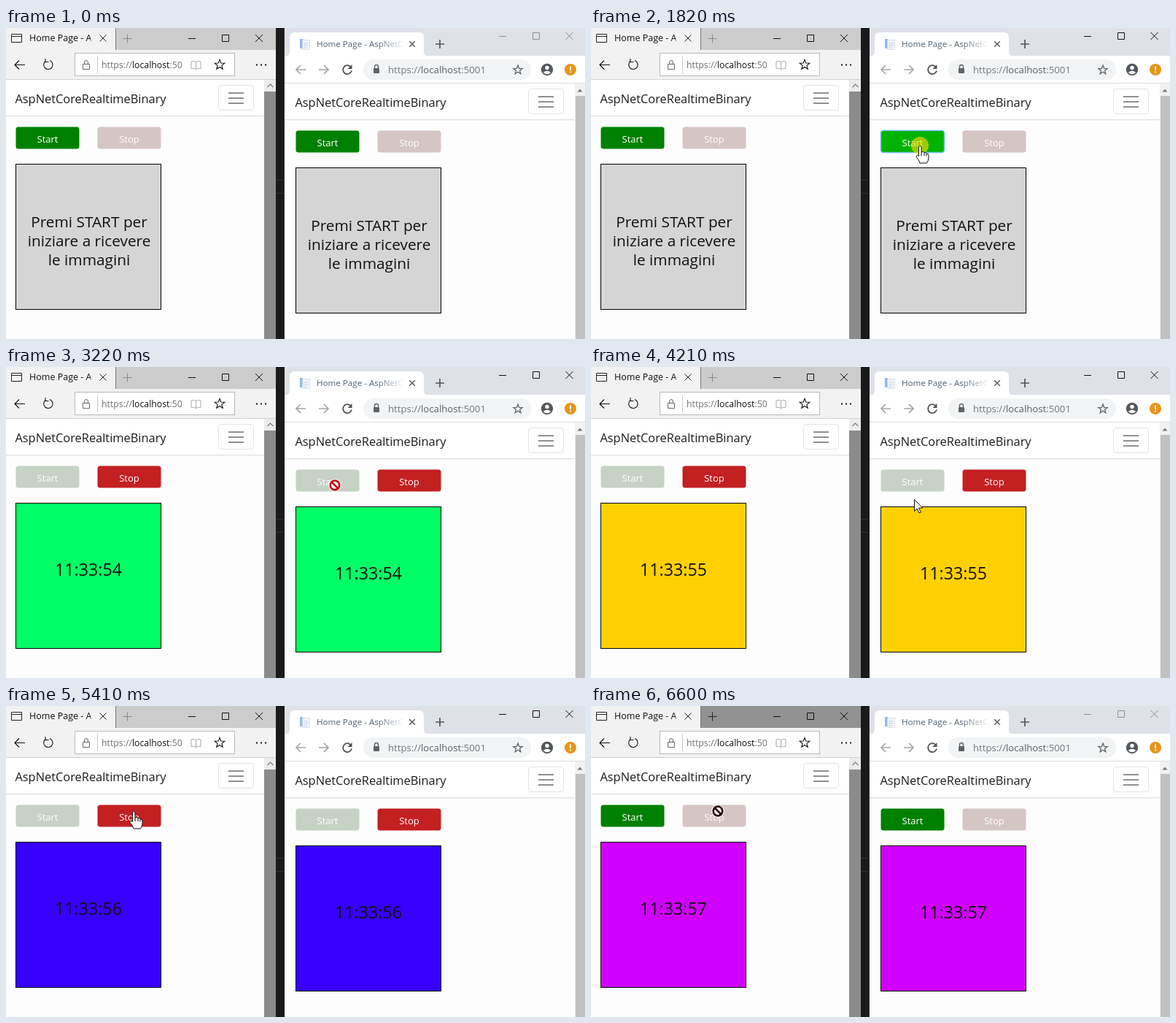
An HTML page for the animation above (8000 ms loop, 794 by 426 pixels).

```html
<!DOCTYPE html>
<html lang="it">
<head>
<meta charset="utf-8">
<title>Realtime images</title>
<style>
  html, body { margin: 0; width: 100%; height: 100%; overflow: hidden; background: #fdfdfd; }
  svg { display: block; width: 794px; height: 426px; }
  text { font-family: "Open Sans", "Noto Sans", sans-serif; }
  .mid { text-anchor: middle; }
  .line { fill: none; stroke: currentColor; }
</style>
</head>
<body>
<svg id="stage" viewBox="0 0 794 426" xmlns="http://www.w3.org/2000/svg"></svg>
<script>
const LOOP = 8000;
const stage = document.getElementById("stage");

const rect = (x, y, w, h, fill, extra = "") =>
  `<rect x="${x}" y="${y}" width="${w}" height="${h}" fill="${fill}" ${extra}/>`;
const line = (d, color = "#111", width = 1, extra = "") =>
  `<path class="line" d="${d}" style="color:${color}" stroke-width="${width}" ${extra}/>`;
const text = (x, y, size, fill, content, extra = "") =>
  `<text x="${x}" y="${y}" font-size="${size}" fill="${fill}" ${extra}>${content}</text>`;
const cross = (x, y, r) => `M${x - r} ${y - r}l${2 * r} ${2 * r}M${x + r} ${y - r}l${-2 * r} ${2 * r}`;
const plus = (x, y, r) => `M${x - r} ${y}h${2 * r}M${x} ${y - r}v${2 * r}`;
const square = (x, y) => `M${x} ${y}h9v9h-9z`;

function star(x, y, r) {
  const points = Array.from({ length: 10 }, (_, i) => {
    const a = i * Math.PI / 5 - Math.PI / 2, d = i % 2 ? r * 0.42 : r;
    return `${(x + d * Math.cos(a)).toFixed(2)} ${(y + d * Math.sin(a)).toFixed(2)}`;
  });
  return `M${points.join("L")}Z`;
}

// The same web page is shown in both windows, at different offsets.
function page(id, dx, dy, left, right, menuX) {
  const button = (name, label, x) =>
    rect(x + 0.5, 135.5, 87, 30, "#008000", `rx="3.5" id="${id}${name}"`) +
    text(x + 44, 157, 13, "#fff", label, 'class="mid"');
  const prompt = ["Premi START per", "iniziare a ricevere", "le immagini"]
    .map((s, i) => text(114, 273 + 26 * i, 20.8, "#111", s, 'class="mid"')).join("");
  return `<g transform="translate(${dx} ${dy})">` +
    rect(left - dx, 71, right - left, 360, "#fdfdfd") +
    rect(left - dx, 71, right - left, 49, "#fff") +
    rect(left - dx, 120, right - left, 1, "#e0e0e0") +
    rect(left - dx, 121, right - left, 1, "#f4f4f4") +
    text(12.4, 103, 16.4, "#1c1c1c", "AspNetCoreRealtimeBinary") +
    rect(menuX + 0.5, 78.5, 48, 34, "#fff", 'rx="3.5" stroke="#e3e3e3"') +
    line([89, 96, 103].map(y => `M${menuX + 14} ${y}h21`).join(""), "#808080", 1.75) +
    button("Start", "Start", 13) + button("Stop", "Stop", 125) +
    rect(13.5, 186.5, 199, 199, "#d5d5d5", `stroke="#000" id="${id}Image"`) +
    `<g id="${id}Prompt">${prompt}</g>` +
    text(113, 286, 23.2, "#101010", "", `class="mid" id="${id}Clock"`) + "</g>";
}

const leftWindow =
  page("l", 0, 0, 0, 354, 291) +
  rect(0, 0, 370, 30, "#ccc", 'id="lTitle"') +
  rect(0, 0, 150, 30, "#f2f2f2") + rect(0, 30, 370, 40, "#f2f2f2") +
  rect(150, 0, 1, 30, "#777") + rect(0, 70, 370, 1, "#d2d2d2") +
  line("M7.500 8.500h14v11h-14zM7.500 11.500h14", "#222") +
  `<g clip-path="url(#tabClip)">${text(32, 18, 12.5, "#111", "Home Page - AspNetCore")}</g>` +
  line(cross(133, 14, 4.5), "#222") +
  line(plus(166.5, 14.5, 6), "#888", 1, 'id="lPlus"') +
  line("M250 14.500h10" + square(296.5, 9.5) + cross(347, 14, 5)) +
  line("M26 50.500H12m6-6-6 6 6 6", "#111", 1.2) +
  line("M54 45.500A6.200 6.200 0 1 0 60 44.500M54 42v4.500h4.500", "#111", 1.1) +
  rect(94.5, 34.5, 219, 31, "#fff", 'stroke="#b9b9b9"') +
  line("M105.500 49.500h9v7h-9zM107.500 49.500v-2.500a2.500 2.500 0 0 1 5 0v2.500", "#666") +
  rect(125, 38, 1, 24, "#c8c8c8") +
  `<g clip-path="url(#urlClip)">` +
  text(131, 55, 12.3, "#707070", 'https://<tspan fill="#111">localhost</tspan>:5001') + "</g>" +
  line("M260.500 46.500v10M260.500 46.500q-3-2-6.500-.5v9.500q3.500-1 6.500 1 3-2 6.500-1V46q-3.500-1.500-6.500.5", "#aaa") +
  line(star(293, 50.5, 7.2), "#111", 1.1) +
  [344, 350, 356].map(x => rect(x - 1, 49.5, 2, 2, "#111")).join("") +
  rect(354, 71, 16, 16, "#ececec") + line("M358.500 81l4-4 4 4", "#777", 1.1) +
  rect(354, 87, 16, 339, "#8b8b8b", 'id="lThumb"');

const rightWindow =
  page("r", 384, 5, 382, 780, 332) +
  rect(382, 0, 412, 39, "#dee1e6") + rect(382, 38, 412, 38, "#fff") +
  `<path d="M382 39q7 0 7-7V13q0-7 7-7h170q7 0 7 7v19q0 7 7 7z" fill="#fff"/>` +
  rect(382, 75, 412, 1, "#dcdcdc") +
  rect(403, 15, 4, 13, "#8fbbe8") + rect(406.5, 16.5, 10, 13, "#f1f5f9", 'stroke="#ced8e2" stroke-width=".7"') +
  line("M408.500 21h6m-6 3h6m-6 3h4", "#b4c4d5", 0.8) +
  text(426, 26, 11.6, "url(#fade)", "Home Page - AspNetC") +
  line(cross(557, 22, 3.8), "#555b61", 1.5) + line(plus(595, 22, 6), "#50565c", 1.7) +
  `<g id="rControls">${line("M676 11.500h10" + square(722.5, 6.5) + cross(772.5, 11, 5), "inherit")}</g>` +
  line("M411 57h-13m6-6-6 6 6 6", "#a3a5a8", 1.7) +
  line("M429 57h13m-6-6 6 6-6 6", "#a3a5a8", 1.7) +
  line("M472.500 53A6 6 0 1 0 474 58.500", "#4f5357", 1.8) +
  `<path d="M474.500 50v6h-6z" fill="#4f5357"/>` +
  rect(490, 43, 230, 28, "#f1f3f4", 'rx="14"') +
  rect(504, 55, 8, 7, "#5f6368", 'rx="1"') + line("M505.500 55v-2a2.500 2.500 0 0 1 5 0v2", "#5f6368", 1.4) +
  text(524, 62, 13.2, "#73777c", 'https://<tspan fill="#5a5e63">localhost</tspan>:5001') +
  line(star(702, 57.5, 6.5), "#5f6368", 1.3) +
  `<circle cx="742" cy="57" r="8.200" fill="#54585c"/><circle cx="742" cy="54.500" r="2.700" fill="#fff"/>` +
  `<path d="M736.800 61q5.200-4.500 10.400 0-5.200 4.500-10.400 0" fill="#fff"/>` +
  `<circle cx="774" cy="57" r="8" fill="#e6951b"/>` + rect(773, 52.5, 2, 5.5, "#fff") + rect(773, 59.5, 2, 2, "#fff") +
  rect(780, 76, 14, 350, "#f1f1f1") + rect(781, 93, 13, 333, "#c1c1c1") +
  `<path d="M783.500 87.500h7l-3.500-4z" fill="#777"/>`;

const cursors =
  `<circle id="glow" r="12" fill="#ffd800" opacity=".62"/>` +
  `<path id="arrow" d="M.5.5V16.500L4.200 13 6.900 19 9.200 18 6.600 12H11.800Z" fill="#fff" stroke="#111"/>` +
  `<g id="hand" stroke="#111" stroke-linejoin="round">` +
  `<path d="M-1.500 2Q0-1 2 1.500V9Q5 7.500 6 9.500 8.500 8.500 9 11 12 10.500 12 13.500V17Q12 20 9.500 24H0Q-1 20-5 15.500-4.500 12-1.500 14.500Z" fill="#fff"/>` +
  `<path class="line" d="M2 9v5M6 10v4M9 11.500v3"/></g>` +
  `<g id="block" fill="none"><circle r="6.500" stroke="#fff" stroke-width="4.600"/>` +
  `<g id="blockSign" stroke-width="2.700"><circle r="6.300" fill="#fff" fill-opacity=".75"/><path d="M-4.400-4.400 4.400 4.400"/></g></g>`;

stage.innerHTML = `<defs>
  <clipPath id="tabClip"><rect x="30" width="86.500" height="30"/></clipPath>
  <clipPath id="urlClip"><rect x="130" y="36" width="112" height="28"/></clipPath>
  <linearGradient id="fade" gradientUnits="userSpaceOnUse" x1="510" x2="546">
    <stop stop-color="#4f6070"/><stop offset="1" stop-color="#4f6070" stop-opacity="0"/>
  </linearGradient></defs>` +
  rect(370, 0, 12, 426, "#1a1a1a") + rect(370, 208, 12, 1, "#303030") + rect(370, 226, 12, 1, "#303030") +
  leftWindow + rightWindow + rect(381, 0, 1, 426, "#1a1a1a", 'id="rEdge"') + cursors;

const el = id => document.getElementById(id);
const set = (id, name, value) => el(id).setAttribute(name, value);
const show = (id, on) => set(id, "visibility", on ? "visible" : "hidden");
const current = (list, t) => list.filter(item => item[0] <= t).pop();

// Start time, fill, clock
const images = [
  [0, "#d5d5d5", ""],
  [2240, "#00c3ff", "11:33:53"],
  [3220, "#00ff66", "11:33:54"],
  [4210, "#ffd000", "11:33:55"],
  [5190, "#3700ff", "11:33:56"],
  [6280, "#d000ff", "11:33:57"]
];

// The pointer glides to Start, slowing down, sampled every 110 ms.
const approach = Array.from({ length: 7 }, (_, i) => {
  const left = (1 - i / 6) ** 2;
  return [940 + 110 * i, 451 + 163 * left, 161 + 236 * left, i < 5 ? "arrow" : "hand"];
});
const pointer = [
  [0, 0, 0, ""],
  ...approach,
  [2240, 451, 162, "block"],
  [3550, 442, 178, "arrow"],
  [3660, 438, 195, "arrow"],
  [3880, 443, 181, "arrow"],
  [4760, 361, 168, "arrow"],
  [4870, 252, 152, "arrow"],
  [4970, 176, 147, "hand"],
  [5300, 175, 141, "hand"],
  [5410, 175, 144, "hand"],
  [6600, 174, 144, "block"]
];

function update(t) {
  const [, fill, clock] = current(images, t);
  const [, x, y, kind] = current(pointer, t);
  const running = t >= 2240 && t < 6600;
  const rightActive = t >= 1820 && t < 6520;
  const leftActive = t >= 6520;
  const startPressed = t >= 1820 && t < 2240;
  const stopPressed = t >= 6520 && t < 6600;

  for (const id of ["l", "r"]) {
    const hover = id === "r" && t >= 1490 && t < 2240;
    set(id + "Start", "fill", running ? "#c5d2c4" : hover ? "#00b300" : "#008000");
    set(id + "Stop", "fill", running ? "#c32022" : "#d6c5c5");
    set(id + "Image", "fill", fill);
    show(id + "Prompt", !clock);
    el(id + "Clock").textContent = clock;
  }
  set("rStart", "stroke", startPressed ? "#6fbcec" : "none");
  set("rStart", "stroke-width", 1.6);

  set("lTitle", "fill", leftActive ? "#929292" : "#ccc");
  el("lPlus").style.color = leftActive ? "#222" : "#888";
  set("lThumb", "fill", t >= 4760 && t < 4870 ? "#6b6b6b" : "#8b8b8b");
  el("rControls").firstChild.style.color = rightActive ? "#111" : "#8c8f93";
  set("rEdge", "fill", rightActive ? "#1a1a1a" : "#333");

  for (const id of ["arrow", "hand", "block"]) {
    show(id, id === kind);
    set(id, "transform", `translate(${Math.round(x)} ${Math.round(y)})`);
  }
  set("blockSign", "stroke", t < 6520 ? "#c40f1c" : "#2b0710");
  show("glow", startPressed || stopPressed);
  set("glow", "transform", `translate(${x} ${y})`);
}

function frame() {
  update(performance.now() % LOOP);
  requestAnimationFrame(frame);
}
frame();
</script>
</body>
</html>
```
